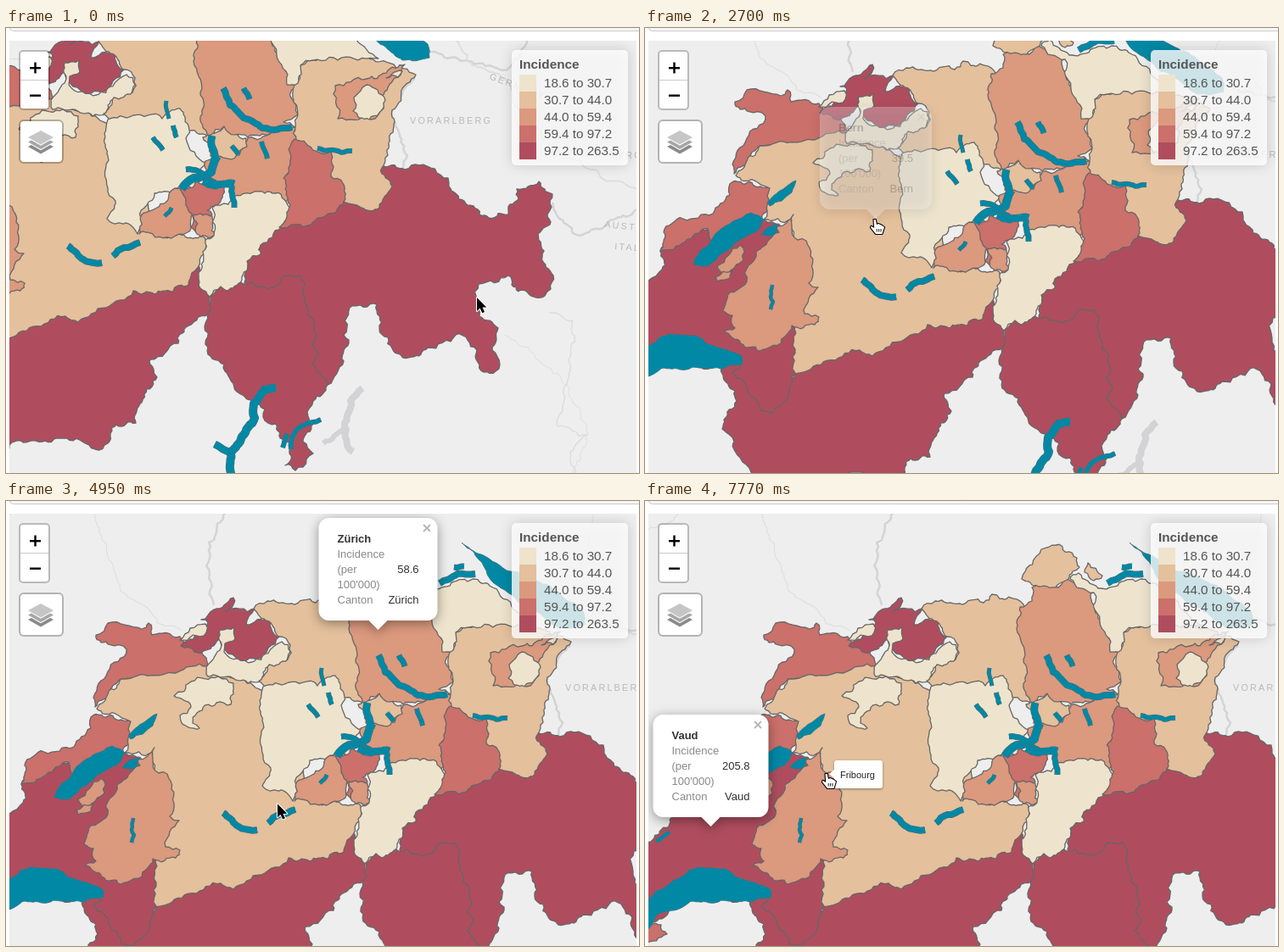
An HTML page with a canvas that plays this animation: 746x525 px, repeating every 8000 ms.

```html
<!DOCTYPE html>
<html lang="en">
<head>
<meta charset="utf-8">
<title>Incidence map</title>
<style>
html, body { margin: 0; width: 100%; height: 100%; overflow: hidden; background: #fff; }
canvas { display: block; width: 746px; height: 525px; }
</style>
</head>
<body>
<canvas id="stage" width="746" height="525"></canvas>
<script>
const ctx = document.getElementById('stage').getContext('2d');
const LOOP = 8000;
const SANS = '"Liberation Sans", Arial, sans-serif';
const CLASSES = ['#eee4cd', '#e4c09c', '#db997e', '#cb706b', '#af4d5e'];
const RANGES = ['18.6 to 30.7', '30.7 to 44.0', '44.0 to 59.4', '59.4 to 97.2', '97.2 to 263.5'];
const WATER = '#0088a5';

// Sheets the outlines were measured on: [scale, dx, dy] into map units
const MAIN = [1, 0, 0], EAST = [1, 183, 111], WIDE = [2, -373, -207];

const parse = (text, [k, dx, dy] = MAIN) => text.split(' ').map(p => {
  const [x, y] = p.split(',').map(Number);
  return [x * k + dx, y * k + dy];
});

const hash = (x, y) => {
  const v = Math.sin(x * 12.9898 + y * 78.233) * 43758.5453;
  return v - Math.floor(v);
};

// Midpoint displacement; the same edge bends alike in both directions
function rough(path, a, b, amount) {
  const dx = b[0] - a[0], dy = b[1] - a[1], len = Math.hypot(dx, dy);
  if (len < 5.5 || !amount) return path.lineTo(b[0], b[1]);
  const side = dx < 0 || (dx === 0 && dy < 0) ? -1 : 1;
  const d = (hash(a[0] + b[0], a[1] + b[1]) - 0.5) * side * Math.min(amount, 8 / len);
  const mid = [(a[0] + b[0]) / 2 - dy * d, (a[1] + b[1]) / 2 + dx * d];
  rough(path, a, mid, amount);
  rough(path, mid, b, amount);
}

function outline(text, sheet, amount, closed = true) {
  const pts = parse(text, sheet), path = new Path2D();
  path.moveTo(...pts[0]);
  for (let i = 1; i < pts.length; i++) rough(path, pts[i - 1], pts[i], amount);
  if (closed) {
    rough(path, pts[pts.length - 1], pts[0], amount);
    path.closePath();
  }
  return path;
}

const cantons = [], lakes = [], ground = [];
const canton = (c, pts, sheet) => cantons.push({ fill: CLASSES[c], path: outline(pts, sheet, 0.45) });
// A lake is a ribbon along its axis, or an area when it has no width
const lake = (width, pts, sheet) => lakes.push({ width, path: outline(pts, sheet, 0.2, !width) });
const line = (color, width, pts, sheet) => ground.push({ color, width, path: outline(pts, sheet, 0.45, false) });

// Graubünden, Ticino, Valais
canton(4, '281,300 285,270 320,235 400,200 445,163 470,167 487,162 521,177 522,187 540,204 558,220 569,224 592,220 594,208 604,202 602,190 628,181 644,196 643,211 638,220 641,232 627,243 632,270 645,292 642,308 635,316 596,303 592,292 557,302 558,340 580,354 573,380 582,397 577,405 563,406 555,380 544,368 530,362 497,377 478,388 455,378 440,355 437,326 405,330 398,362 404,368 398,393 379,421 340,390', EAST);
canton(4, '241,315 253,304 290,300 315,306 329,292 346,292 352,301 350,311 366,362 361,373 368,383 360,396 379,421 362,440 356,458 362,467 350,488 362,502 350,518 341,522 329,516 337,492 328,488 318,467 303,459 305,450 272,429 238,385 234,352', EAST);
canton(4, '115,466 200,440 411,393 412,418 423,428 421,449 395,464 386,483 353,502 361,523 336,566 336,577 313,579 303,601 288,608 273,599 243,595 187,603 167,621 145,618 125,595 105,559 91,544 93,533 108,511 90,469');
// Geneva, Vaud, Neuchâtel, Jura
canton(3, '-79,545 -73,527 -43,503 -15,500 -8,511 -34,525 -53,543');
canton(4, '-55,452 -55,429 4,369 20,356 18,334 75,308 150,300 175,320 180,420 175,470 170,496 150,526 137,523 103,478 112,466 20,472 -30,500 -47,490');
canton(3, '18,334 22,312 45,296 80,290 100,268 104,252 147,260 147,274 138,296 78,326 74,308');
canton(3, '106,158 120,144 160,151 168,144 172,158 205,160 236,185 240,196 200,203 160,213 135,210 105,243 103,232 142,175');
// Bern, Fribourg
canton(1, '107,245 135,210 200,203 238,194 345,240 350,330 370,358 415,357 419,368 402,400 398,414 358,425 333,421 301,441 268,458 253,451 187,477 172,486 177,450 173,298 140,297 147,260');
canton(2, '141,328 158,312 155,305 175,291 173,306 180,321 190,322 195,340 193,372 204,377 193,390 188,408 205,412 200,421 173,422 165,435 135,452 93,430 106,425 103,410 92,405 97,390 120,370 131,335');
canton(2, '85,352 112,327 116,345 96,360');
canton(2, '82,364 103,358 100,366 85,370');
// Basel, Solothurn, Aargau
canton(4, '206,171 238,143 230,140 245,128 268,114 268,122 258,130 293,127 283,146 310,137 322,160 296,187 280,190 262,180 252,162 236,176 222,178');
canton(0, '205,164 217,150 235,145 236,155');
canton(0, '238,207 236,196 252,176 252,152 269,149 270,163 258,168 257,178 290,190 325,166 335,178 331,190 312,195 300,213 285,215 262,207');
canton(0, '198,230 218,213 250,207 268,215 265,240 248,238 225,250 220,262 228,268 207,262 205,253 218,243');
canton(1, '292,127 308,118 365,120 375,110 412,122 430,150 420,240 370,222 305,219 298,212 310,193 332,187 335,170 322,160');
// Lucerne, Obwalden, Nidwalden
canton(0, '303,219 333,214 367,218 388,206 398,226 395,241 420,270 405,300 358,306 342,335 338,354 302,336 312,315 303,300 303,262');
canton(2, '340,354 343,331 382,300 396,301 403,331 397,352 378,359');
canton(3, '388,301 408,292 440,298 438,311 420,326 426,331 422,350 401,346 395,316');
canton(2, '404,331 426,333 429,355 408,354');
// Schwyz, Zug, Uri
canton(2, '418,268 458,261 468,241 525,228 527,245 513,285 518,310 505,318 492,307 458,316 447,299 428,294');
canton(1, '415,240 440,226 466,241 467,251 453,264 424,262');
canton(0, '426,323 445,319 453,309 500,306 521,323 508,346 483,367 483,378 467,386 461,408 443,421 436,416 423,428 412,418 418,361 428,356');
// Zürich, St. Gallen, Glarus, Appenzell
canton(2, '404,150 408,125 422,118 422,102 440,95 453,102 462,88 495,105 496,128 525,175 520,195 527,213 510,222 523,228 468,240 440,227 420,237 412,187');
canton(1, '521,193 530,155 605,142 666,166 638,216 633,261 626,276 638,298 623,323 581,316 525,243 527,213');
canton(3, '340,131 365,145 383,145 383,175 397,183 397,208 360,232 322,235 333,215 333,165', EAST);
canton(2, '388,68 425,60 470,43 450,70 443,80 445,95 430,108 391,107', EAST);
canton(0, '410,82 425,67 438,73 447,85 440,100 428,108 409,98', EAST);
canton(0, '448,59 455,54 467,51 462,58', EAST);
// Thurgau, Schaffhausen
canton(0, '467,92 477,85 500,103 550,92 570,100 622,147 545,149 530,155 527,176 514,178 513,162 496,128 495,108');
canton(1, '410,92 433,57 450,52 475,67 478,78 470,83 455,97 430,101');
canton(1, '484,84 488,73 505,88 495,94');

lake(7, '439,182 447,202 463,217 485,229 520,228');
lake(6, '463,182 470,195');
lake(0, '-30,470 16,437 28,432 61,434 114,458 115,467 20,472 -19,487 -43,517');
lake(0, '57,350 78,322 125,289 140,297 130,312 75,352');
lake(0, '145,278 163,261 178,251 173,265 147,281');
lake(0, '137,315 145,306 157,304 151,316');
lake(7, '256,368 272,383 296,388');
lake(7, '309,380 322,370 341,364');
lake(3.5, '150,374 148,388 151,394 148,403');
lake(5, '356,240 368,255');
lake(4, '372,197 375,218');
lake(5, '380,226 384,240');
lake(8, '426,238 426,252 430,269');
lake(5, '449,250 457,260');
lake(9, '390,301 404,288 425,281 432,262');
lake(6, '395,278 410,280 430,294');
lake(8, '415,292 430,297 452,295');
lake(6, '449,297 452,323');
lake(5, '550,253 565,255 591,256');
lake(5, '484,245 491,265');
lake(4, '370,333 378,323');
lake(4, '-21,401 -5,390');
lake(0, '537,49 556,62 590,82 655,112 680,130 682,146 650,149 607,122 575,97 566,82');
lake(7, '511,97 532,86 553,86');
lake(6, '528,78 540,77');
lake(9, '302,427 318,425', EAST);
lake(9, '305,427 292,443 293,460 278,482 264,500 265,525 271,550', EAST);
lake(8, '246,491 265,501', EAST);
lake(5, '326,495 332,479', EAST);
lake(5, '371,462 350,469 340,478 336,497', EAST);

// Faint base map
line('#dfdfe0', 1.2, '4,100 75,108 130,133 215,103 238,110 258,160 290,180', WIDE);
line('#e2e2e2', 1.2, '150,365 90,362 60,352 4,350', WIDE);
line('#e2e2e2', 1.2, '150,525 135,480 145,455 90,400 80,360', WIDE);
line('#e2e2e2', 1.2, '535,15 528,50 540,90 520,165', WIDE);
line('#e2e2e2', 1.2, '571,340 605,365 620,395 605,440 602,490 640,500 690,480 743,520', WIDE);
line('#d4d4d6', 2.5, '333,-20 331,60 319,108 306,128 309,165', WIDE);
line('#d4d4d6', 2.5, '525,172 556,180 575,182 585,165 650,138 665,125 743,135', WIDE);
line('#d4d4d6', 2.5, '600,262 612,280 660,265 690,250 695,215 743,203', WIDE);
line('#d4d4d6', 2.5, '250,412 232,445 250,462 268,490 262,530', WIDE);
line('#d4d4d6', 2.5, '482,60 455,108 473,150 468,166', EAST);
line('#dedee0', 2, '530,15 545,40 590,62 600,90 640,140 743,190', EAST);
line('#dedede', 1.6, '640,335 668,345 671,370 650,470 685,480 665,500 675,530', EAST);
line('#d3d3d6', 8, '420,425 406,440 399,470 409,500', EAST);
line('#d3d3d6', 6, '399,472 374,490', EAST);

// Place labels: [text, x, y, angle]
const wideLabels = [
  ['WUERTTEMBERG', 399, 31], ['OGNE-', 4, 212], ['CHE-', 4, 227], ['MTÉ', 4, 242],
  ['TYROL', 662, 217], ['TRENTINO-', 640, 328], ['ALTO ADIGE', 638, 342],
  ['AOSTA VALLEY', 236, 438], ['LOMBARDY', 490, 454], ['VENETO', 709, 456],
  ['ERGNE-', 6, 472], ['HÔNE-', 4, 487], ['ALPES', 4, 501]
];
const nearLabels = [
  ['VORARLBERG', 476, 113], ['GERMANY', 569, 60, 0.35], ['AUSTRIA', 705, 235, 0.1],
  ['ITALY', 717, 261, 0.08], ['TYROL', 712, 154], ['FRANCE', -66, 515, -0.75]
];

// View: [s, ox, oy], screen = map * s + offset
const moves = [
  { at: 130, span: 300, to: [0.5, 186.5, 103.5], power: 2.4, base: 1 },
  { at: 1645, span: 300, to: [1, 0, -71], power: 2.4, base: 0.5 },
  { at: 4250, span: 300, to: [1, 0, 0], power: 3, base: 1 },
  { at: 7020, span: 300, to: [1, 34, 0], power: 3, base: 1 }
];

const popups = [
  { name: 'Bern', value: '39.5', x: 272, y: 296, w: 132, from: 2640, till: 4250 },
  { name: 'Zürich', value: '58.6', x: 438.5, y: 152, w: 140, from: 4250, till: 5480 },
  { name: 'Valais', value: '111.9', x: 299, y: 476, w: 136, from: 5500, till: 7020 },
  { name: 'Vaud', value: '205.8', x: 43.5, y: 384, w: 136, from: 7020, till: 9000 }
];

// Pointer stops: [time, x, y, shape used from here on]
const stops = [
  [0, 555, 318, 'arrow'], [470, 555, 318, 'arrow'], [1050, 45, 64, 'arrow'],
  [1200, 41, 57, 'hand'], [1350, 36, 54, 'hand'], [1810, 36, 54, 'hand'],
  [2400, 271, 226, 'hand'], [3380, 271, 226, 'hand'], [3750, 424, 87, 'hand'],
  [4050, 436, 81, 'hand'], [4500, 436, 81, 'arrow'], [4950, 320, 357, 'arrow'],
  [5390, 298, 481, 'hand'], [6380, 298, 481, 'hand'], [6730, 44, 391, 'hand'],
  [7320, 44, 391, 'hand'], [7700, 214, 322, 'hand'], [8000, 214, 322, 'hand']
];

const clamp = v => Math.max(0, Math.min(1, v));
const mix = (a, b, p) => a + (b - a) * p;

function viewAt(t) {
  let view = [1, -183, -111], ratio = 1;
  for (const m of moves) {
    if (t < m.at) break;
    const p = clamp((t - m.at) / m.span);
    const eased = 1 - (1 - p) ** m.power;
    view = view.map((v, i) => mix(v, m.to[i], eased));
    ratio = p < 1 ? view[0] / m.base : 1;
  }
  return { s: view[0], ox: view[1], oy: view[2], ratio };
}

function text(str, x, y, font, color, align = 'left') {
  ctx.font = `${font} ${SANS}`;
  ctx.fillStyle = color;
  ctx.textAlign = align;
  ctx.fillText(str, x, y);
}

function box(x, y, w, h, r, fill) {
  ctx.beginPath();
  ctx.roundRect(x, y, w, h, r);
  ctx.fillStyle = fill;
  ctx.fill();
}

function shadow(color, blur, dy = 0) {
  ctx.shadowColor = color;
  ctx.shadowBlur = blur;
  ctx.shadowOffsetY = dy;
}
const noShadow = () => shadow('transparent', 0);

function shape(points, fill, stroke, width = 1) {
  ctx.beginPath();
  parse(points).forEach(p => ctx.lineTo(...p));
  ctx.closePath();
  ctx.lineWidth = width;
  ctx.fillStyle = fill;
  if (stroke) {
    ctx.strokeStyle = stroke;
    ctx.stroke();
  }
  ctx.fill();
}

function drawLabels(view, wide) {
  const base = wide ? 0.5 : 1;
  const [k, dx, dy] = wide ? WIDE : EAST;
  ctx.letterSpacing = '2.2px';
  for (const [str, x, y, angle = 0] of wide ? wideLabels : nearLabels) {
    ctx.save();
    ctx.translate((x * k + dx) * view.s + view.ox, (y * k + dy) * view.s + view.oy);
    ctx.scale(view.s / base, view.s / base);
    ctx.rotate(angle);
    text(str, 0, 0, '10.8px', '#b9b9bb');
    ctx.restore();
  }
  ctx.letterSpacing = '0px';
}

function drawLake({ width, path }, border) {
  ctx.strokeStyle = '#666';
  ctx.lineWidth = width + border;
  ctx.stroke(path);
  if (width) {
    ctx.strokeStyle = WATER;
    ctx.lineWidth = width;
    ctx.stroke(path);
  } else {
    ctx.fill(path);
  }
}

function drawMap(view, t) {
  ctx.save();
  ctx.beginPath();
  ctx.rect(4, 15, 739, 510);
  ctx.clip();
  ctx.fillStyle = '#eeeeee';
  ctx.fillRect(4, 15, 739, 510);
  ctx.lineJoin = 'round';

  const toMap = () => {
    ctx.save();
    ctx.translate(view.ox, view.oy);
    ctx.scale(view.s, view.s);
  };
  toMap();
  for (const g of ground) {
    ctx.strokeStyle = g.color;
    ctx.lineWidth = g.width > 5 ? g.width : g.width / view.s;
    ctx.stroke(g.path);
  }
  ctx.restore();

  drawLabels(view, t > 280 && t < 1740);

  toMap();
  const thin = view.ratio / view.s;
  for (const c of cantons) {
    ctx.lineWidth = 1.3 * thin;
    ctx.strokeStyle = '#666';
    ctx.fillStyle = c.fill;
    ctx.fill(c.path);
    ctx.stroke(c.path);
  }
  ctx.fillStyle = WATER;
  for (const l of lakes) drawLake(l, thin);
  ctx.restore();
  ctx.restore();
}

function drawPopup(p, view, t) {
  const alpha = Math.min(clamp((t - p.from) / 220), 1 - clamp((t - p.till) / 220));
  if (alpha <= 0) return;
  const x = p.x * view.s + view.ox, y = p.y * view.s + view.oy;
  const left = x - p.w / 2, right = x + p.w / 2, top = y - 132;
  ctx.save();
  ctx.beginPath();
  ctx.rect(4, 15, 739, 510);
  ctx.clip();
  ctx.globalAlpha = alpha;
  shadow('rgba(0,0,0,.4)', 14, 3);
  ctx.beginPath();
  ctx.roundRect(left, top, p.w, 121, 12);
  ctx.moveTo(x + 12, top + 120);
  ctx.lineTo(x, y);
  ctx.lineTo(x - 12, top + 120);
  ctx.closePath();
  ctx.fillStyle = '#fff';
  ctx.fill();
  noShadow();
  text(p.name, left + 22, top + 29, 'bold 13px', '#333');
  ['Incidence', '(per', "100'000)", 'Canton'].forEach((s, i) =>
    text(s, left + 22, top + 47 + i * 18, '13px', '#8a8a8a'));
  text(p.value, right - 22, top + 65, '13px', '#333', 'right');
  text(p.name, right - 22, top + 101, '13px', '#333', 'right');
  const cx = right - 12.5, cy = top + 12;
  ctx.beginPath();
  for (const d of [-1, 1]) {
    ctx.moveTo(cx - 4, cy - 4 * d);
    ctx.lineTo(cx + 4, cy + 4 * d);
  }
  ctx.strokeStyle = '#b5b5b5';
  ctx.lineWidth = 1.8;
  ctx.stroke();
  ctx.restore();
}

function drawControls() {
  box(15, 26, 37, 71, 5, 'rgba(0,0,0,.22)');
  box(17, 28, 33, 67, 3, '#fff');
  ctx.fillStyle = '#ccc';
  ctx.fillRect(17, 61, 33, 1);
  ctx.fillStyle = '#000';
  ctx.fillRect(28, 46, 13, 2.4);
  ctx.fillRect(33.3, 40.5, 2.4, 13);
  ctx.fillRect(28, 78.5, 13, 2.4);

  box(15, 108, 53, 52, 6, 'rgba(0,0,0,.25)');
  box(17, 110, 49, 48, 4, '#fff');
  ['#8a8a8a', '#a6a6a6', '#c6c6c6'].forEach((fill, i) => {
    const y = 140 - i * 5.5;
    shape(`41,${y - 8} 56,${y} 41,${y + 8.5} 26,${y}`, fill, '#fff', 2);
  });
}

function drawLegend() {
  shadow('rgba(0,0,0,.2)', 15);
  box(596, 26, 137, 136, 5, 'rgba(255,255,255,.8)');
  noShadow();
  text('Incidence', 605, 48, 'bold 15.3px', '#555');
  CLASSES.forEach((c, i) => {
    ctx.fillStyle = c;
    ctx.fillRect(605, 55 + i * 20, 20, 20);
    text(RANGES[i], 634, 70 + i * 20, '15.2px', '#555');
  });
}

function drawTooltip(x, y) {
  shadow('rgba(0,0,0,.4)', 3, 1);
  box(x + 9, y - 16, 57, 33, 3, '#fff');
  noShadow();
  shape(`${x + 3},${y} ${x + 10},${y - 6} ${x + 10},${y + 6}`, '#fff');
  text('Fribourg', x + 16, y + 5, '11px', '#222');
}

function drawPointer(t) {
  const i = Math.max(0, stops.findIndex(s => s[0] > t) - 1);
  const [t0, x0, y0, kind] = stops[i], [t1, x1, y1] = stops[i + 1];
  const p = clamp((t - t0) / (t1 - t0));
  const x = mix(x0, x1, p), y = mix(y0, y1, p);
  if (t > 7640) drawTooltip(x, y);
  ctx.save();
  ctx.translate(x, y);
  ctx.lineJoin = 'round';
  if (kind === 'arrow') {
    shape('0,0 0,16 3.6,12.6 6.2,18.2 9,17 6.5,11.6 11.3,11.4', '#000', '#fff', 2);
  } else {
    shape('-1.5,0 .8,0 2,6 4,5 8.5,7 11,9 8.5,17 1,17 -5,9.5 -4.5,7.8 -.8,10', '#fff', '#000', 2.2);
    ctx.beginPath();
    for (const dx of [2.2, 4.6, 7]) {
      ctx.moveTo(dx, 11);
      ctx.lineTo(dx, 14.5);
    }
    ctx.lineWidth = 0.9;
    ctx.stroke();
  }
  ctx.restore();
}

function drawPage() {
  ctx.fillStyle = '#fff';
  ctx.fillRect(0, 0, 746, 525);
  ctx.beginPath();
  ctx.roundRect(4.5, -10, 760, 13.5, 4);
  ctx.fillStyle = '#f5f5f5';
  ctx.fill();
  ctx.strokeStyle = '#ccc';
  ctx.lineWidth = 1;
  ctx.stroke();
}

function frame(now) {
  const t = now % LOOP;
  const view = viewAt(t);
  drawPage();
  drawMap(view, t);
  popups.forEach(p => drawPopup(p, view, t));
  drawControls();
  drawLegend();
  drawPointer(t);
}

const start = performance.now();
function tick() {
  frame(performance.now() - start);
  requestAnimationFrame(tick);
}
tick();
</script>
</body>
</html>
```
